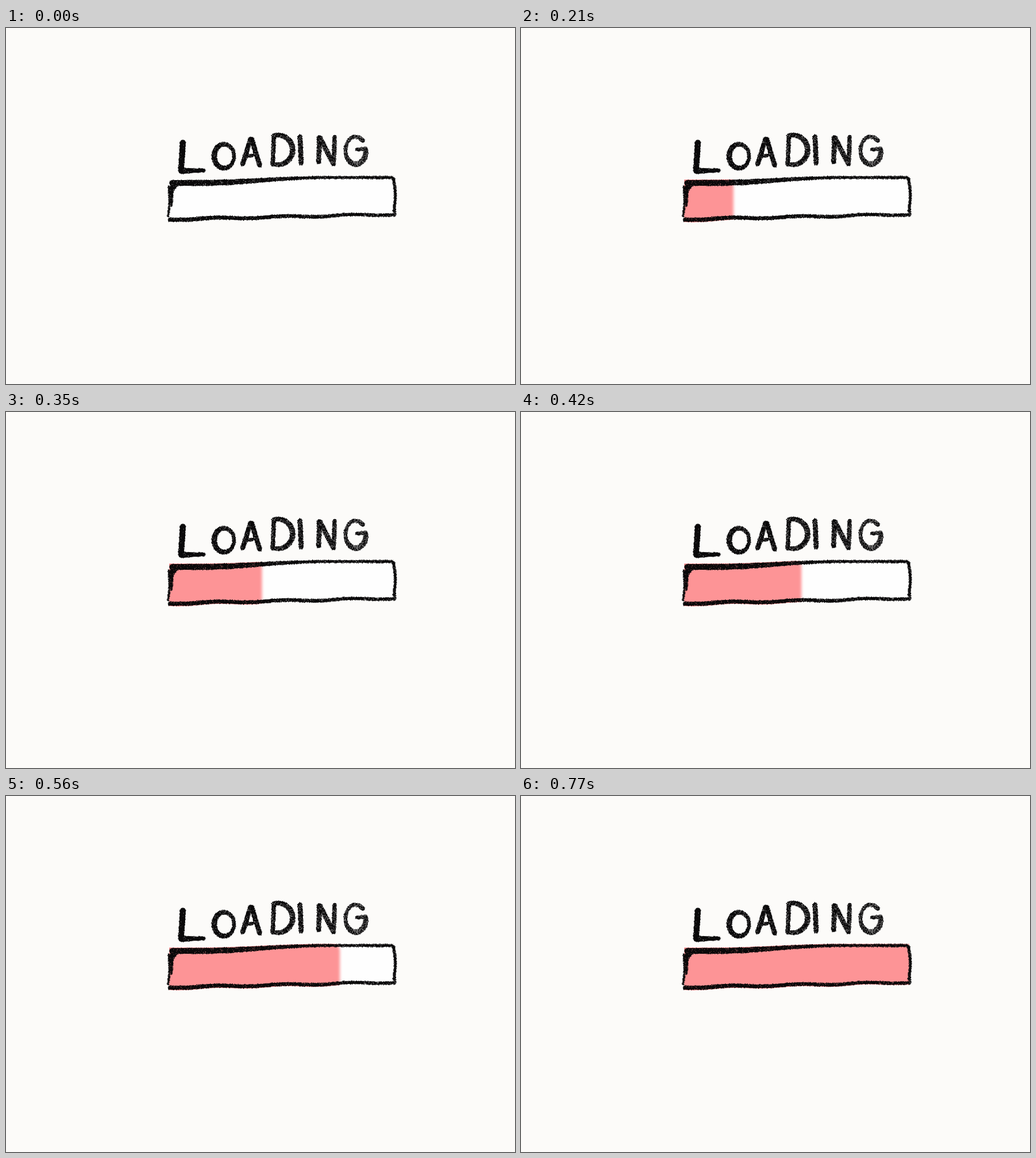
Write an HTML page with a canvas that moves like this. It is 895 by 625 pixels and loops after 840 ms.

```html
<!DOCTYPE html>
<html lang="en">
<head>
<meta charset="utf-8">
<title>Loading</title>
<style>
  html, body { margin: 0; width: 100%; height: 100%; overflow: hidden; background: #fcfbf9; }
  canvas { display: block; }
</style>
</head>
<body>
<canvas id="stage" width="895" height="625" role="img" aria-label="LOADING"></canvas>
<script>
const W = 895, H = 625, STEP = 70, STEPS = 12;
const PAPER = '#fcfbf9', BAR = '#fefefe', INK = '#0b0a0b', PINK = '#fd9496';
const LEFT = 287, RIGHT = 683;
const { PI, sin, cos, min, max, hypot } = Math;
const ctx = document.getElementById('stage').getContext('2d');

let seed = 7;
const rand = () => (seed = (seed * 16807) % 2147483647) / 2147483647;
const mix = (a, b, t) => a + (b - a) * t;
const ease = t => t * t * (3 - 2 * t);

const layer = document.createElement('canvas');
layer.width = W;
layer.height = H;
const ink = layer.getContext('2d');

function dot(x, y, r) {
  ink.beginPath();
  ink.arc(x, y, r, 0, 2 * PI);
  ink.fill();
}

// A dot placed at random on a disc; near = 1 keeps it on the rim.
function scatter(x, y, w, near) {
  const a = rand() * 2 * PI, r = w / 2 * mix(Math.sqrt(rand()), 1, near);
  dot(x + r * cos(a), y + r * sin(a), 0.4 + rand() * 0.45);
}

// Crayon stroke along at(u) = [x, y, width]; words get grainier to the right.
function crayon(length, at) {
  const path = Array.from({ length: Math.ceil(length) }, (_, i) => at(i / length));
  ink.fillStyle = INK;
  for (const [x, y, w] of path) {
    dot(x, y, max(0.8, w / 2 - 0.7));
    for (let k = 0; k < 3; k++) scatter(x, y, w, 0.9);
  }
  ink.globalCompositeOperation = 'destination-out';
  for (const [x, y, w] of path) {
    const grain = y < 257 ? (x - 280) / 400 : 0.2;
    for (let k = 0; k < w / 3; k++) {
      if (rand() > grain) continue;
      ink.globalAlpha = 0.2 + rand() * 0.4;
      scatter(x, y, w, 0.3);
    }
  }
  ink.globalAlpha = 1;
  ink.globalCompositeOperation = 'source-over';
}

function line(x0, y0, x1, y1, w0, w1 = w0, bow = 0) {
  crayon(hypot(x1 - x0, y1 - y0), u =>
    [mix(x0, x1, u) + bow * sin(PI * u), mix(y0, y1, u), mix(w0, w1, u)]);
}

// Elliptic stroke, thickest at the angle "heavy".
function arc(cx, cy, rx, ry, from, to, heavy) {
  crayon(Math.abs(to - from) * max(rx, ry), u => {
    const a = mix(from, to, u);
    return [cx + rx * cos(a), cy + ry * sin(a), 8.3 + 1.7 * cos(a - heavy)];
  });
}

function drawWord() {
  // L
  line(311, 201, 308, 248, 11, 11);
  line(308, 251, 348, 250, 11, 7);
  // O
  arc(383.5, 225, 17.5, 21, 0, 2 * PI, PI);
  // A
  line(430, 195, 416, 239, 9);
  line(432, 195, 446, 241, 9);
  line(421, 226, 440, 222, 6);
  // D
  line(471, 192, 469, 240, 8);
  arc(478, 214, 26, 26, -PI / 2 - 0.3, PI / 2 + 0.3, 0);
  // I
  line(517, 191, 519, 237, 9);
  // N
  line(551, 192, 550, 235, 9);
  line(552, 193, 576, 239, 9);
  line(578, 191, 576, 239, 8);
  // G
  arc(615, 215, 18, 24, -0.8, -2 * PI, PI / 4);
  line(633, 212, 617, 213, 7);
}

// Top line of the bar steps up and thins out; the bottom line wavers upwards.
const rise = x => ease(min(1, max(0, (x - 340) / 220)));
const topY = x => 272 - 9.5 * rise(x);
const topPen = x => 11 - 5.5 * rise(x);
const along = x => (x - LEFT) / (RIGHT - LEFT);
const bottomY = x => 336 - 9 * along(x) + 1.3 * sin(21 * along(x) + 0.3);
const bottomPen = x => 8 - 2 * along(x);

function drawBar() {
  const span = RIGHT - LEFT;
  crayon(span, u => {
    const x = mix(LEFT + 5, RIGHT - 3, u);
    return [x, topY(x), topPen(x)];
  });
  crayon(span, u => {
    const x = mix(LEFT + 1, RIGHT + 1, u);
    return [x, bottomY(x), bottomPen(x)];
  });
  line(298, 275, 291, 283, 10);
  line(291, 281, 291, 313, 9, 4);
  line(286, 278, 285, 331, 4, 4, 2);
  line(681, 264, 682, 322, 6, 5, 3);
  line(683, 309, 685, 328, 3);
}

function barPath(pad) {
  ctx.beginPath();
  for (let x = LEFT; x <= RIGHT; x += 4) ctx.lineTo(x, topY(x) - pad * topPen(x));
  for (let x = RIGHT; x >= LEFT; x -= 4) ctx.lineTo(x, bottomY(x) + pad * bottomPen(x));
  ctx.closePath();
}

// The fill gains speed, then slows towards the end; one key for every two steps.
const KEYS = [285, 340, 407, 493, 587, 665, 712];
function edgeAt(step) {
  const i = step >> 1;
  return step % 2 ? mix(KEYS[i], KEYS[i + 1], 0.5) : KEYS[i];
}

function draw(step) {
  ctx.fillStyle = PAPER;
  ctx.fillRect(0, 0, W, H);
  ctx.fillStyle = BAR;
  barPath(0);
  ctx.fill();
  if (step) {
    ctx.save();
    barPath(0.55);
    ctx.clip();
    ctx.filter = 'blur(2.5px)';
    ctx.fillStyle = PINK;
    ctx.beginPath();
    ctx.roundRect(240, 256, edgeAt(step) - 240, 90, 16);
    ctx.fill();
    ctx.restore();
  }
  ctx.drawImage(layer, 0, 0);
}

drawWord();
drawBar();

const start = performance.now();
let shown = -1;
function tick() {
  const step = Math.floor((performance.now() - start) / STEP) % STEPS;
  if (step !== shown) draw(shown = step);
  requestAnimationFrame(tick);
}
tick();
</script>
</body>
</html>
```
